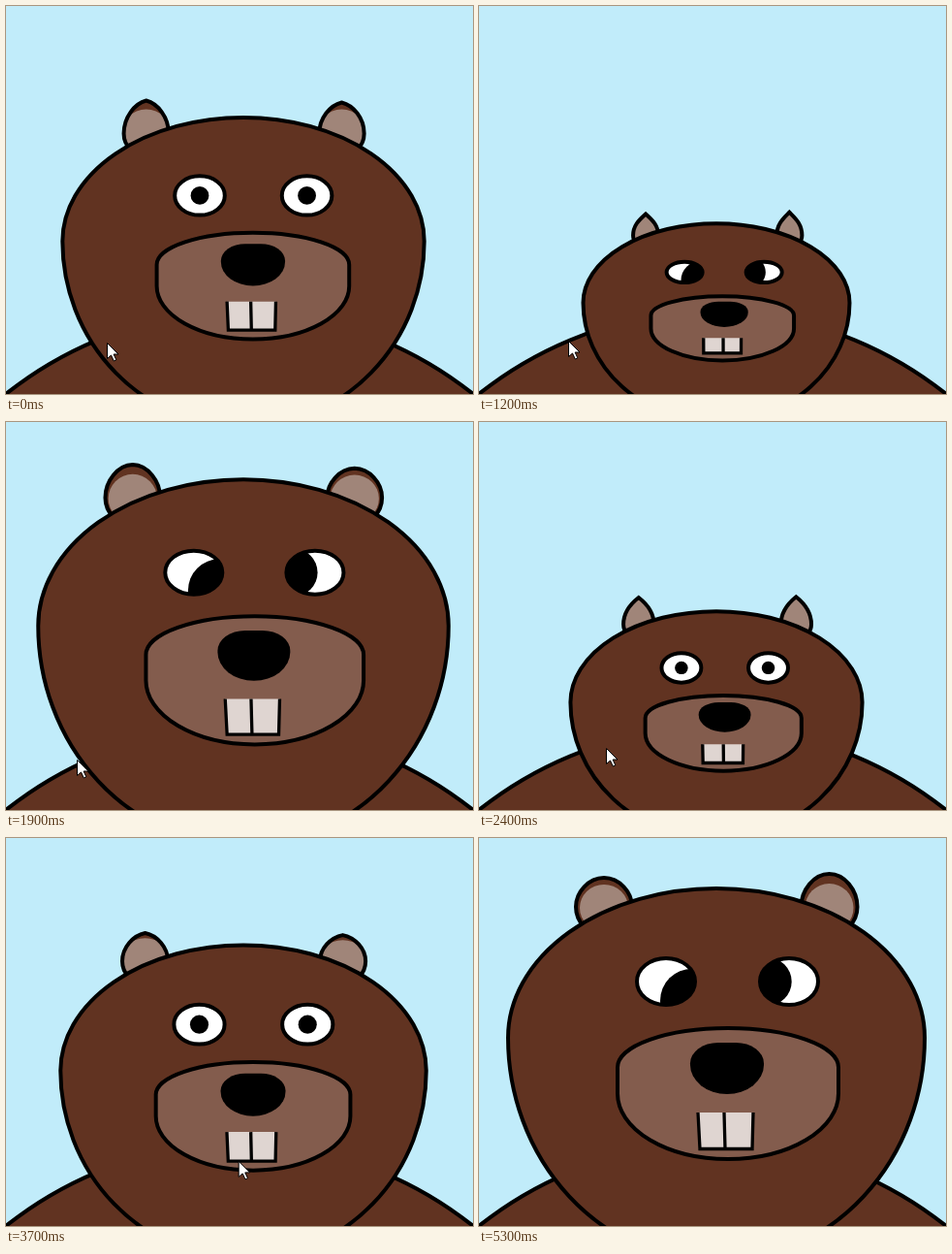
Animation, 482 px wide and 400 px high, one loop 5400 ms. Source, as an HTML page with a canvas:

```html
<!DOCTYPE html>
<html lang="en">
<head>
<meta charset="utf-8">
<title>Curious bear</title>
<style>
html, body { margin: 0; width: 100%; height: 100%; overflow: hidden; background: #c1ecfa; }
canvas { display: block; }
</style>
</head>
<body>
<canvas id="stage" width="482" height="400"></canvas>
<script>
const ctx = document.getElementById('stage').getContext('2d');
const LOOP = 5400, STEP = 100;
const SKY = '#c1ecfa', FUR = '#613321', SNOUT = '#835c4d', EAR = '#a08579', TOOTH = '#dfd5d1';

// Tracks of [time, value...]; eased between keys.
const tracks = {
  rise: [[-290, 1], [430, 0], [1090, 0], [1900, .96], [2620, 0], [3270, 0], [3970, 1]],
  cross: [[1000, 0], [1200, 1], [1900, 1], [2100, 0], [4300, 0], [4500, 1]],
  shut: [[4000, 0], [4200, 1], [4400, 0]],
  squint: [[900, 0], [1200, 2.8], [1500, 0], [1700, 0], [1900, 1], [2100, 0]],
  bob: [[0, -5], [400, 0], [900, 0], [1200, 5], [1900, -4], [2400, 0]],
  twitch: [[4300, 0], [4500, -8], [4800, 0], [5000, 0], [5300, -8]],
  eyeLift: [[3900, 0], [4200, 2], [4500, -2]],
  mouse: [[0, 104, 347], [1200, 92, 345], [1900, 73, 348], [2400, 131, 336],
          [3300, 197, 171], [3950, 260, 410]]
};

const mix = (a, b, k) => a + (b - a) * k;

function at(keys, t) {
  let i = keys.findIndex(k => k[0] > t);
  if (i < 0) return keys[keys.length - 1].slice(1);
  if (i === 0) return keys[0].slice(1);
  const a = keys[i - 1], b = keys[i];
  const k = (1 - Math.cos(Math.PI * (t - a[0]) / (b[0] - a[0]))) / 2;
  return a.slice(1).map((v, n) => mix(v, b[n + 1], k));
}

function fill(path, color) {
  ctx.fillStyle = color;
  ctx.fill(path);
}

function outline(path, width = 4) {
  ctx.strokeStyle = '#000';
  ctx.lineWidth = width;
  ctx.stroke(path);
}

function oval(x, y, rx, ry = rx) {
  const path = new Path2D();
  ctx.beginPath();
  path.ellipse(x, y, rx, ry, 0, 0, Math.PI * 2);
  return path;
}

// Rounded box; radii are fractions of its width and height.
function blob(l, t, r, b, topY, bottomY, topX = .5) {
  const w = r - l, h = b - t, path = new Path2D();
  const top = { x: w * topX, y: h * topY }, bottom = { x: w * .5, y: h * bottomY };
  path.roundRect(l, t, w, h, [top, top, bottom, bottom]);
  return path;
}

function clipped(path, draw) {
  ctx.save();
  ctx.clip(path);
  draw();
  ctx.restore();
}

// A leaf when low, round when high.
function ear(x, top, p) {
  const r = 12.3 + 16.7 * p, y = 244 - 173 * p, h = y - top;
  const cx = r * mix(.45, .55, p), cy = h * mix(.74, 1, p), side = h * .5;
  const path = new Path2D();
  path.moveTo(x, top);
  path.bezierCurveTo(x + cx, y - cy, x + r, y - side, x + r, y);
  path.bezierCurveTo(x + r, y + r * .55, x + r * .55, y + r, x, y + r);
  path.bezierCurveTo(x - r * .55, y + r, x - r, y + r * .55, x - r, y);
  path.bezierCurveTo(x - r, y - side, x - cx, y - cy, x, top);
  path.closePath();
  fill(path, FUR);
  clipped(path, () => fill(oval(x, y + 1, 28 - 3 * p, Math.min(28 - 3 * p, h - 6 * p)), EAR));
  outline(path);
}

function eye(x, p, s, look) {
  const rx = 18 + 12 * p, ry = 13 + 11 * p - s.squint;
  const y = 280 - 130 * p + s.eyeLift;
  const shape = oval(x, y, rx, ry);
  fill(shape, '#fff');
  clipped(shape, () => {
    const k = s.cross;
    const r = mix(5.5 + 6 * p, rx * look.size, k);
    fill(oval(x + rx * look.dx * k, y + ry * look.dy * k, r), '#000');
    if (s.shut > 0) {
      const gap = 2 * ry * (1 - s.shut);
      fill(oval(x, y + gap, rx, ry), SNOUT);
      fill(oval(x, y - 9 - gap, rx + 3, ry), FUR);
    }
  });
  outline(shape);
}

function teeth(p) {
  const l = 232 - 6 * p, r = 270 + 13 * p, m = 252 + 2 * p;
  const top = 345 - 62 * p, bottom = 359.5 - 39 * p;
  const path = new Path2D();
  path.moveTo(l, top);
  path.lineTo(l + 2 * p, bottom);
  path.lineTo(r - p, bottom);
  path.lineTo(r, top);
  fill(path, TOOTH);
  path.moveTo(m - p, top);
  path.lineTo(m, bottom);
  outline(path, 3.3);
}

function pointer(x, y) {
  ctx.save();
  ctx.translate(x + .5, y + .5);
  const arrow = new Path2D('M0 0V16L4 12.5L6.8 18.5L9.3 17.3L6.6 11.5H11.5Z');
  fill(arrow, '#fff');
  outline(arrow, 1);
  ctx.restore();
}

const lookLeft = { dx: .9, dy: .82, size: 1.1 };
const lookRight = { dx: -.74, dy: 0, size: .83 };

function draw(t) {
  const s = {};
  for (const name in tracks) {
    const v = at(tracks[name], t);
    s[name] = v.length > 1 ? v : v[0];
  }
  const p = s.rise;

  ctx.fillStyle = SKY;
  ctx.fillRect(0, 0, 482, 400);

  const body = oval(241, 736, 400, 421);
  fill(body, FUR);
  outline(body);

  ear(174 - 45 * p, 217 - 176 * p + s.bob, p);
  ear(318.5 + 43 * p, 215 - 170 * p + s.bob + s.twitch, p);

  const half = 134 + 81 * p;
  const head = blob(245 - half, 232 - 180 * p, 245 + half, 428 + 9 * p, .4, .6);
  fill(head, FUR);
  outline(head);

  eye(213 - 20 * p, p, s, lookLeft);
  eye(293 + 27 * p, p, s, lookRight);

  const snout = blob(179 - 36 * p, 304 - 108 * p, 323 + 48 * p, 367 - 36 * p, .3, .5);
  fill(snout, SNOUT);
  outline(snout);
  fill(blob(229 - 11 * p, 309 - 98 * p, 277 + 17 * p, 334 - 70 * p, .4, .57, .38), '#000');
  teeth(p);

  if (s.mouse[1] < 400) pointer(...s.mouse);
}

const start = performance.now();
function tick() {
  const t = (performance.now() - start) % LOOP;
  draw(Math.floor(t / STEP) * STEP);
  requestAnimationFrame(tick);
}
tick();
</script>
</body>
</html>
```
